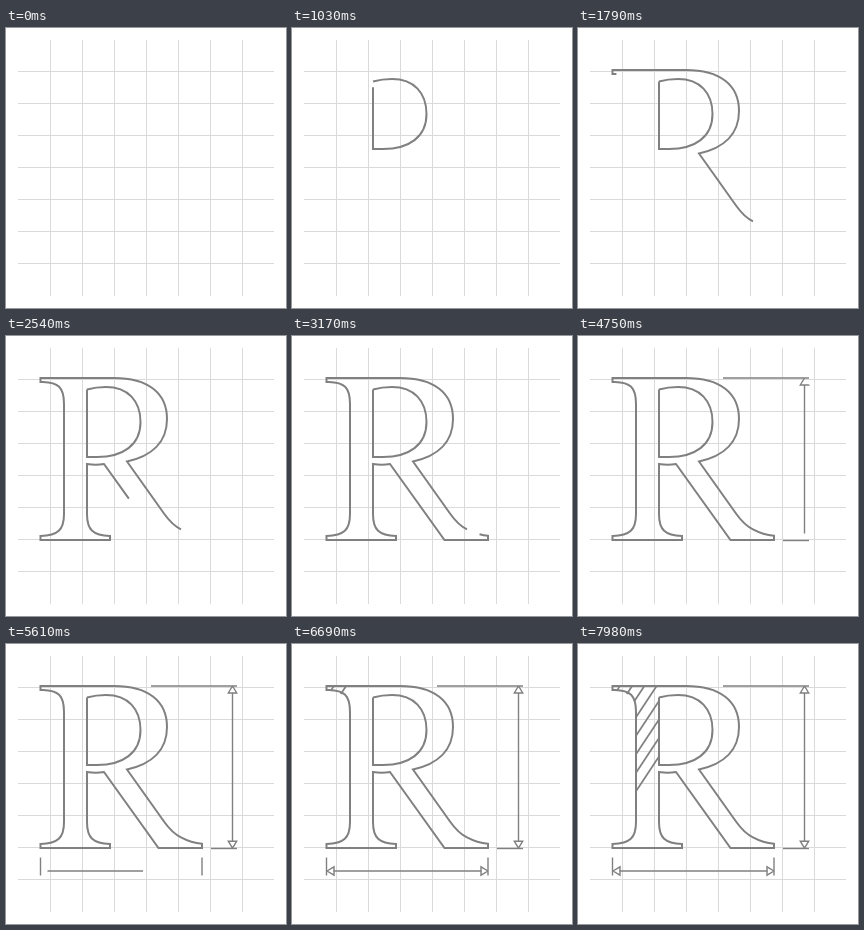
These frames come from a looping animation (280x280 px, 8 s). An HTML page:

```html
<!DOCTYPE html>
<html lang="en">
<head>
<meta charset="utf-8">
<title>Letter construction</title>
<style>
  html, body { margin: 0; width: 100%; height: 100%; overflow: hidden; background: #fff; }
  svg { display: block; width: 100vw; height: 100vh; }
  path { fill: none; }
  .grid { stroke: #dadada; stroke-width: 1; }
  .ink path { stroke: #808080; stroke-dasharray: 1 2; stroke-dashoffset: 1.01; }
  .letter { stroke-width: 2; }
  .hatch { stroke-width: 1.7; }
  .measure { stroke-width: 1.4; }
</style>
</head>
<body>
<svg viewBox="0 0 280 280">
  <path class="grid" id="grid"/>
  <g class="ink" id="ink"></g>
</svg>
<script>
const LOOP = 8000;
const ink = document.getElementById('ink');

// Adds a stroke that draws itself between two times of the loop.
function draw(kind, d, start, length) {
  const path = document.createElementNS('http://www.w3.org/2000/svg', 'path');
  path.setAttribute('class', kind);
  path.setAttribute('d', d);
  path.setAttribute('pathLength', 1);
  ink.append(path);
  path.animate([
    { strokeDashoffset: 1.01, offset: 0 },
    { strokeDashoffset: 1.01, offset: start / LOOP, easing: 'ease' },
    { strokeDashoffset: 0, offset: Math.min(1, (start + length) / LOOP) },
    { strokeDashoffset: 0, offset: 1 }
  ], { duration: LOOP, iterations: Infinity });
}

let grid = '';
for (let p = 44; p <= 236; p += 32) grid += `M${p + 0.5} 12V268M12 ${p - 0.5}H268`;
document.getElementById('grid').setAttribute('d', grid);

// Letter
draw('letter', `M81 53.5C87 51.8 93 51 100 51C122 51 134.5 65 134.5 86
  C134.5 109 117 121 91 121H81Z`, 555, 600);
draw('letter', `M175 193.3C169 190.5 164 186 158 177.5L121 125.5
  C146 120 161 106 161 83C161 57 142 42 108 42H34.5V46H37C52 46.5 58 51 58 68
  V178C58 194 52 199.5 34.5 200V204H104V200C87 199.5 81 194 81 178V128
  Q90 129.3 98 128L152.5 204H196V199.8C188 199 181 196.5 175 193.3Z`, 1250, 2300);

// Height
draw('measure', 'M145 42H231', 3650, 250);
draw('measure', 'M205 204.5H231', 4000, 90);
draw('measure', 'M226.5 49V197.5', 4205, 400);
draw('measure', 'M226.5 42L222.3 49H230.7Z', 4725, 65);
draw('measure', 'M226.5 204.2L222.3 197.2H230.7Z', 4915, 65);

// Width
draw('measure', 'M34.5 213.5V231.5', 5115, 65);
draw('measure', 'M196 213.5V231.5', 5275, 65);
draw('measure', 'M41.5 227H189.5', 5460, 400);
draw('measure', 'M35 227L42 222.8V231.2Z', 5985, 65);
draw('measure', 'M196 227L189 222.8V231.2Z', 6185, 65);

// Hatching: parallel lines clipped to the stem and its upper serif
const SLOPE = 1.51, STEP = 12.25;
const hatchStart = [6385, 6575, 6795, 7015, 7235, 7425, 7645, 7865];
const hatchFoot = [39, 48.8, 56.3, 58, 58, 58, 58, 58];
hatchStart.forEach((start, i) => {
  const topX = 41.9 + STEP * i;
  const at = x => 42 + (topX - x) * SLOPE;
  const endX = Math.min(topX, 81);
  draw('hatch', `M${endX} ${at(endX)}L${hatchFoot[i]} ${at(hatchFoot[i])}`, start, 115);
});
</script>
</body>
</html>
```
